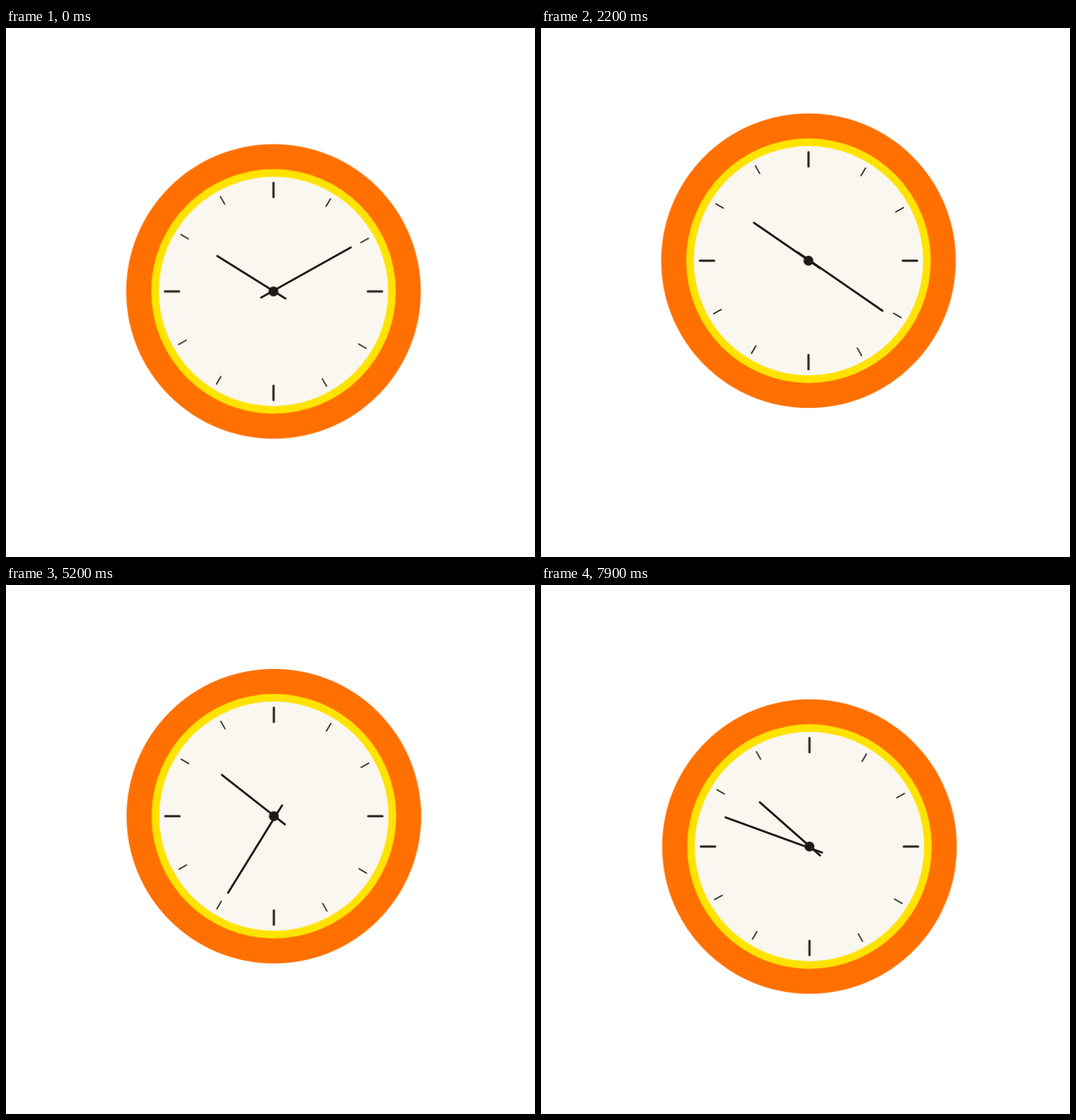
Write an HTML page that moves like this. It is 748x748 px and loops after 8000 ms.

```html
<!DOCTYPE html>
<html lang="en">
<head>
<meta charset="utf-8">
<title>Clock</title>
<style>
  html, body { margin: 0; width: 100%; height: 100%; overflow: hidden; background: #fff; }
  svg { display: block; width: 100%; height: 100%; }
  line { stroke: #1f1a17; stroke-width: 3; stroke-linecap: round; }
  .minor { stroke-width: 1.7; }
  .clock, .hand { animation: 8s infinite; }
  .clock { animation-name: bob; }
  .hand { animation-timing-function: steps(80); }
  .minute { animation-name: minute; }
  .hour { animation-name: hour; }

  /* rises, then sinks a little slower, at ten steps a second */
  @keyframes bob {
    0% { transform: translate(378.2px, 372.5px); animation-timing-function: steps(36); }
    45% { transform: translate(378.2px, 301.4px); animation-timing-function: steps(44); }
    100% { transform: translate(379.6px, 371.4px); }
  }
  @keyframes minute {
    from { transform: translate(.2px, .5px) rotate(60.8deg); }
    to { transform: translate(.2px, .5px) rotate(292.96deg); }
  }
  @keyframes hour {
    from { transform: rotate(301.9deg); }
    to { transform: rotate(311.5deg); }
  }
</style>
</head>
<body>
<svg viewBox="0 0 748 748">
  <defs>
    <g id="quarter">
      <line y1="-153.6" y2="-133.3"/>
      <line class="minor" x1="80.6" y1="-131" x2="74.3" y2="-120.3"/>
      <line class="minor" x1="134.2" y1="-75" x2="123.4" y2="-69"/>
    </g>
  </defs>
  <g class="clock">
    <circle r="208.3" fill="#ff7000"/>
    <circle r="172.9" fill="#ffe300"/>
    <circle r="162.2" fill="#faf7f0"/>
    <use href="#quarter"/>
    <use href="#quarter" transform="rotate(90)"/>
    <use href="#quarter" transform="rotate(180)"/>
    <use href="#quarter" transform="rotate(270)"/>
    <g class="hand hour"><line x1=".5" y1="19.5" x2=".5" y2="-94"/></g>
    <g class="hand minute"><line x1="-1.5" y1="19.3" x2="-1.5" y2="-126"/></g>
    <circle r="7" fill="#1f1a17"/>
  </g>
</svg>
</body>
</html>
```
